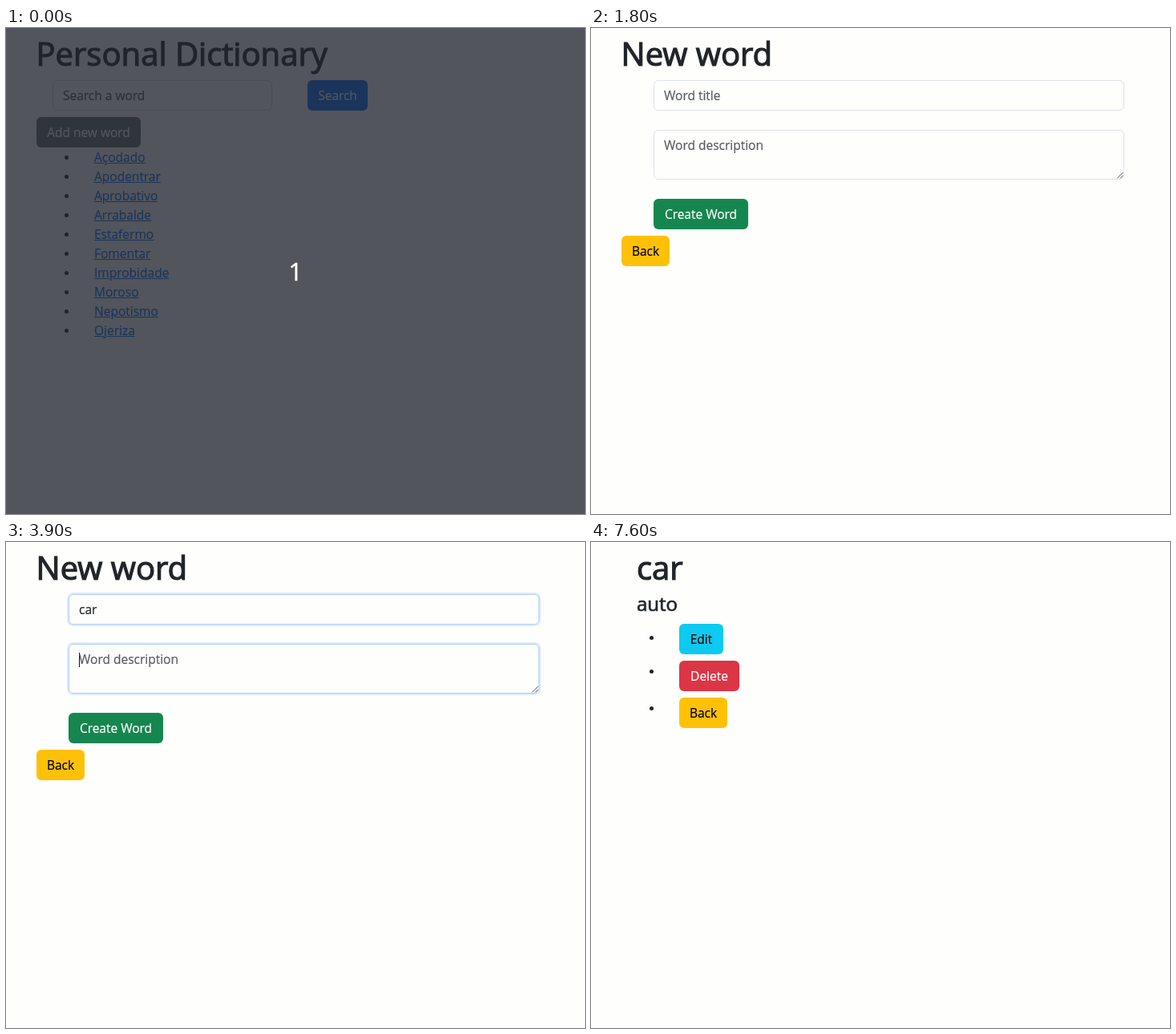
An HTML page that plays this animation: 722 by 606 pixels, repeating every 8000 ms.

```html
<!DOCTYPE html>
<html lang="en">
<head>
<meta charset="utf-8">
<title>Personal Dictionary</title>
<style>
  html, body { margin: 0; width: 100%; height: 100%; overflow: hidden; }
  body {
    background: #fefefd; color: #212529;
    font: 15.5px/24px "Open Sans", "Noto Sans", sans-serif;
    -webkit-text-stroke: .2px;
  }
  #stage { position: relative; width: 722px; height: 606px; overflow: hidden; }
  #stage div, #stage svg { position: absolute; box-sizing: border-box; white-space: pre; }
  #stage .page { inset: 0; }
  .h1 { font-size: 40px; line-height: 48px; top: 8px; -webkit-text-stroke: 1.2px; }
  .h2 { font-size: 24px; line-height: 28.8px; -webkit-text-stroke: .7px; }
  .btn { height: 38px; padding: 7px 0; border-radius: 6px; text-align: center; color: #fff; }
  .dark { color: #000; }
  .field {
    --k: 0;
    padding: 6px 12px; border-radius: 6px;
    border: 1px solid color-mix(in srgb, #86b7fe calc(var(--k) * 100%), #dee2e6);
    box-shadow: 0 0 0 calc(var(--k) * 4px) rgba(13, 110, 253, calc(var(--k) * .27));
  }
  .hint { color: #595c5f; }
  .caret { display: inline-block; width: 1px; height: 18px; margin-right: -1px; vertical-align: -4px; background: #111; }
  .link { left: 110px; color: #0d6efd; text-decoration: underline; }
  .dot { left: 73px; width: 5px; height: 5px; border-radius: 50%; background: #212529; }
  #popup {
    left: 179px; top: 112px; width: 152px; padding: 12px 11px; border-radius: 5px;
    background: #2a2a28; color: #f0f0ee; font-weight: 600; font-size: 15px; line-height: 20px;
    box-shadow: 0 1px 2px rgba(0, 0, 0, .5);
  }
  #popup::before {
    content: ""; position: absolute; left: 11px; top: -7px;
    border: solid transparent; border-width: 0 8px 7px; border-bottom-color: #2a2a28;
  }
  #shade { inset: 0; background: rgba(32, 36, 44, .774); }
  #count {
    left: 0; width: 722px; top: 288px; text-align: center; color: #fff;
    font-size: 31px; line-height: 30px; -webkit-text-stroke: .4px;
  }
</style>
</head>
<body>
<div id="stage">
  <div class="page" id="list">
    <div class="h1" style="left:37.5px">Personal Dictionary</div>
    <div class="field hint" style="left:58px;top:65px;width:274px;height:38px">Search a word</div>
    <div class="btn" style="left:376px;top:65px;width:75px;background:#0d6efd">Search</div>
    <div class="btn" style="left:38px;top:111px;width:130px;background:#6a7274">Add new word</div>
  </div>

  <div class="page" id="form">
    <div class="h1" style="left:37.5px">New word</div>
    <div class="field" id="word" style="left:78px;top:65px;width:587px;height:38px"></div>
    <div class="field" id="desc" style="left:78px;top:127px;width:587px;height:62px"></div>
    <svg style="left:655px;top:179px" width="9" height="9" stroke="#555" fill="none"><path d="M1 8.5L8.5 1M5 8.5L8.5 5"/></svg>
    <div class="btn" style="left:78px;top:213px;width:118px;background:#168650">Create Word</div>
    <div class="btn dark" style="left:38px;top:259px;width:60px;background:#ffc107">Back</div>
    <div id="popup"></div>
  </div>

  <div class="page" id="entry">
    <div class="h1" style="left:57px">car</div>
    <div class="h2" style="left:57px;top:63px">auto</div>
    <div class="btn dark" style="left:110px;top:102px;width:55px;background:#0dcaf0">Edit</div>
    <div class="btn" style="left:110px;top:148px;width:75px;background:#dc3545">Delete</div>
    <div class="btn dark" style="left:110px;top:194px;width:60px;background:#ffc107">Back</div>
  </div>

  <div id="shade"><div id="count">1</div></div>
</div>
<script>
const LOOP = 8000;
const $ = id => document.getElementById(id);
const words = ["Açodado", "Apodentrar", "Aprobativo", "Arrabalde", "Estafermo",
  "Fomentar", "Improbidade", "Moroso", "Nepotismo", "Ojeriza"];

function add(parent, cls, y, text = "") {
  const el = document.createElement("div");
  el.className = cls;
  el.style.top = y + "px";
  el.textContent = text;
  parent.append(el);
}
words.forEach((w, i) => {
  add($("list"), "link", 149 + 24 * i, w);
  add($("list"), "dot", 159 + 24 * i);
});
[117, 159, 205].forEach(y => add($("entry"), "dot", y));

// Each track is a list of [start ms, value], held until the next entry.
const tracks = {
  page: [[0, "list"], [1800, "form"], [7400, "entry"]],
  word: [[0, ""], [2800, "c"], [3000, "ca"], [3200, "car"]],
  wordGlow: [[0, 0], [2500, .5], [2600, 1], [3800, .8], [3900, .5], [4000, 0]],
  wordCaret: [[0, 0], [2500, 1], [3800, 0]],
  desc: [[0, ""], [5600, "a"], [5700, "au"], [5800, "aut"], [5900, "auto"]],
  descGlow: [[0, 0], [3800, .2], [3900, .5], [4000, 1], [7000, .7], [7100, .3], [7200, 0]],
  descCaret: [[0, 0], [3800, 1], [4400, 0], [5000, 1], [6400, 0]],
  popup: [[0, 0], [2600, .6], [2700, 1], [3200, .62], [3300, .25], [3400, 0]],
  options: [[0, words], [2800, ["car", "casa", "copo"]], [3000, ["car", "casa"]], [3100, ["car"]]]
};
const at = (name, t) => tracks[name].findLast(step => step[0] <= t)[1];

function setField(id, hint, t) {
  const text = at(id, t);
  const caret = at(id + "Caret", t) ? '<span class="caret"></span>' : "";
  const html = text ? text + caret : caret + `<span class="hint">${hint}</span>`;
  const el = $(id);
  if (el.dataset.html !== html) el.innerHTML = el.dataset.html = html;
  el.style.setProperty("--k", at(id + "Glow", t));
}

function draw() {
  const t = performance.now() % LOOP;
  const page = at("page", t);
  for (const id of ["list", "form", "entry"]) $(id).style.display = id === page ? "block" : "none";
  $("shade").style.display = t < 100 ? "block" : "none";
  setField("word", "Word title", t);
  setField("desc", "Word description", t);
  $("popup").style.opacity = at("popup", t);
  $("popup").textContent = at("options", t).join("\n");
  requestAnimationFrame(draw);
}
draw();
</script>
</body>
</html>
```
